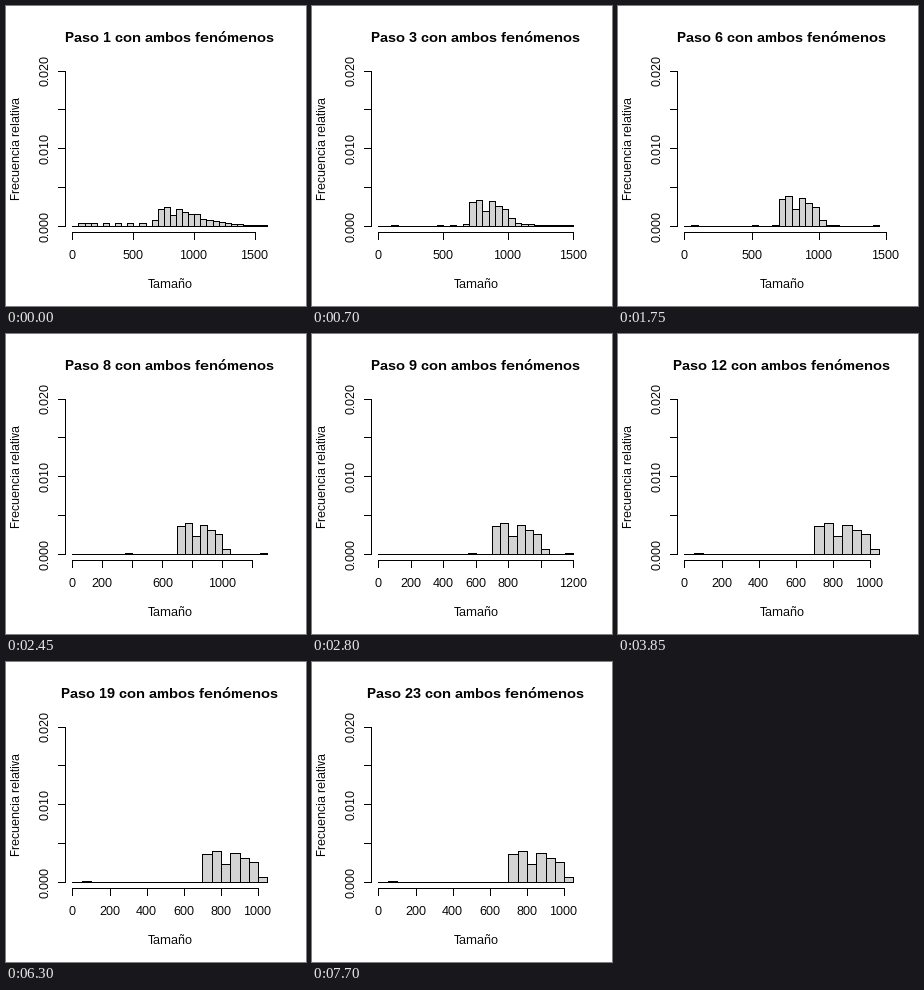
A matplotlib script that plays this animation: 300 by 300 pixels, repeating every 8 s.

```python
import numpy as np
import matplotlib.pyplot as plt
from matplotlib.animation import FuncAnimation
from matplotlib.patches import Rectangle

plt.rcParams.update({
    "font.family": "Liberation Sans",
    "text.hinting": "native",
    "text.hinting_factor": 1,
})

SIZE, DPI = 300, 72
TICK_MS, LOOP_MS, STEP_MS = 50, 8000, 350
X0, X1 = 66.84, 261.96          # pixel span of the data on x
BASE, TOP = 220, 65             # pixel rows of y = 0 and y = 0.02
AXIS_X, AXIS_Y = 59, 226
BIN = 50
LAST = 12                       # the histogram is stable from here on
SETTLED = [28, 31, 18, 29, 24, 20, 5]   # final bars from 700 up, in pixels

fig = plt.figure(figsize=(SIZE / DPI, SIZE / DPI), dpi=DPI, facecolor="white")
ax = fig.add_axes([0, 0, 1, 1])


def largest(step):
    size = np.interp(step, [1, 3, 5, 7, 10], [1600, 1500, 1500, 1440, 1050])
    return int(round(size / BIN)) * BIN


def heights(step):
    """Bar heights: the tails fade as sizes gather between 700 and 1050."""
    spread = .62 ** (step - 1)
    left = np.arange(0, largest(step), BIN)
    bars = np.where(left >= 1000, 9 * spread * np.exp((1000 - left) / 220), 0)
    bars[14:21] += np.array(SETTLED) * (1 - .4 * spread)
    bars[13] = 6 * spread
    for i in range(1 + round(6 * spread)):      # scattered small sizes
        bars[1 + (7 * (LAST - step) + 2 * i) % 11] = 1 + int(2 * spread)
    bars[-1] = max(bars[-1], 1)
    return np.rint(bars).astype(int)


def line(x0, y0, x1, y1):
    ax.plot([x0, x1], [y0, y1], color="black", lw=1, antialiased=False,
            solid_capstyle="projecting")


def label(x, y, s, size=12, ha="center", **kw):
    ax.text(x, y, s, size=size, ha=ha, va="baseline",
            rotation_mode="anchor", **kw)


def draw_bars(step, to_px):
    for i, h in enumerate(heights(step)):
        a, b = int(to_px(i * BIN)), int(to_px((i + 1) * BIN))
        if h:
            ax.add_patch(Rectangle((a, BASE - h), b - a, h, lw=1,
                                   fc="#d3d3d3", ec="black", antialiased=False))
        else:
            line(a, BASE, b, BASE)


def draw_x_axis(x_max, to_px):
    unit = 500 if x_max >= 1450 else 200
    ticks = range(0, int(x_max * 1.04) + 1, unit)
    line(int(X0), AXIS_Y, int(to_px(ticks[-1])), AXIS_Y)
    edge = 0
    for t in ticks:
        x = to_px(t)
        line(int(x), AXIS_Y, int(x), AXIS_Y + 7)
        half = 3.5 * len(str(t))
        if x - half - edge >= 10:       # skip crowded labels
            label(x - .5, 253, str(t))
            edge = x + half


def draw_y_axis():
    line(AXIS_X, BASE, AXIS_X, TOP)
    for i in range(5):
        y = int(BASE + (TOP - BASE) * i / 4)
        line(AXIS_X, y, AXIS_X - 7, y)
        if i % 2 == 0:
            label(43, y, f"{i * .005:.3f}", rotation=90)


def update(i):
    step = i * TICK_MS // STEP_MS + 1
    shape = min(step, LAST)
    x_max = largest(shape)

    def to_px(v):
        return X0 + (X1 - X0) * v / x_max

    ax.clear()
    ax.set(xlim=(0, SIZE), ylim=(SIZE, 0))
    ax.axis("off")
    draw_bars(shape, to_px)
    draw_x_axis(x_max, to_px)
    draw_y_axis()
    label(59 if step < 10 else 55, 36, f"Paso {step} con ambos fenómenos", 14,
          ha="left", weight="bold")
    label(164, 282, "Tamaño")
    label(14, 142, "Frecuencia relativa", rotation=90)
    return []


anim = FuncAnimation(fig, update, frames=LOOP_MS // TICK_MS, interval=TICK_MS,
                     init_func=lambda: [], repeat=True, repeat_delay=0)
plt.show()
```
